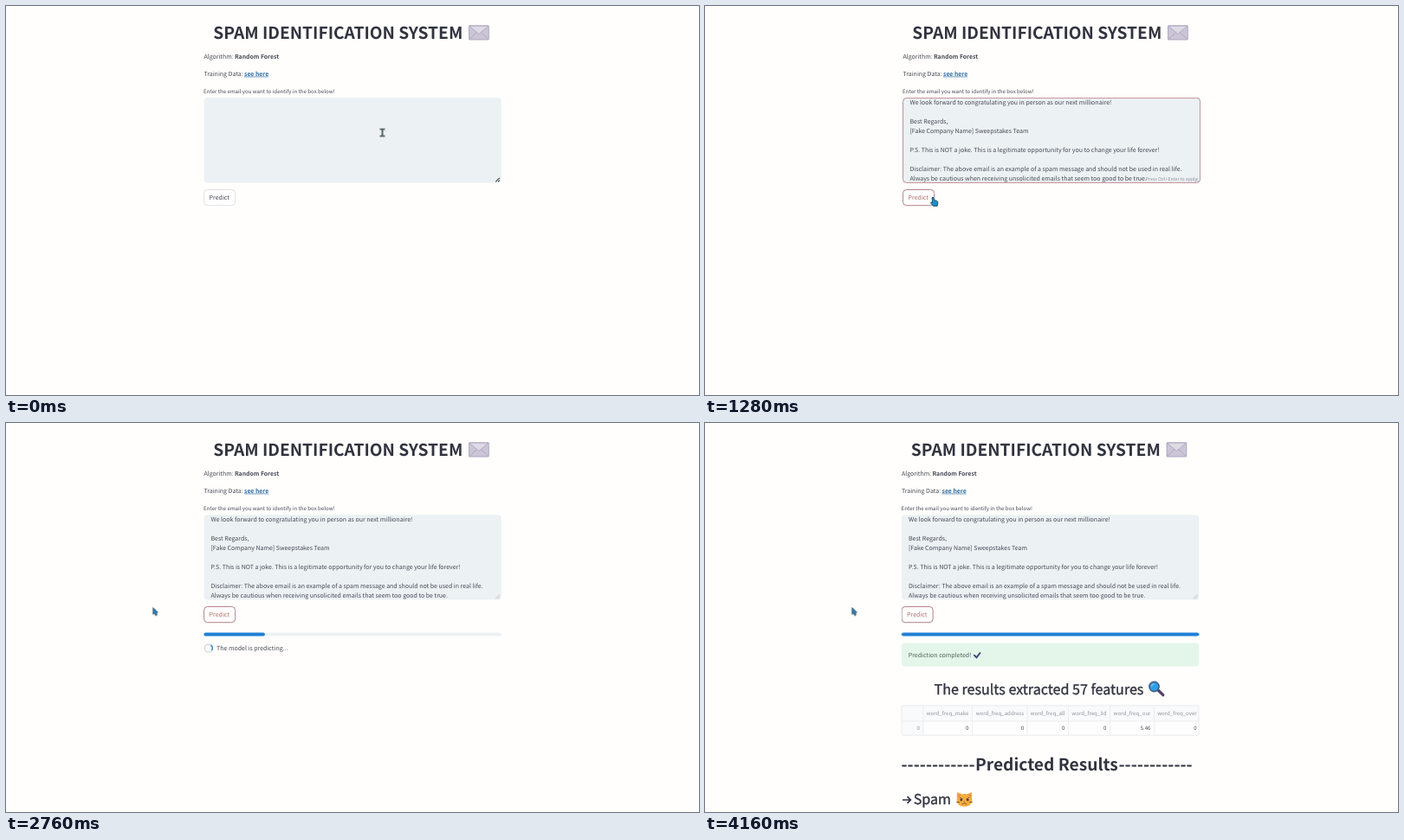
These frames come from a looping animation (800x450 px, 4320 ms). An HTML page:

```html
<!DOCTYPE html>
<html lang="en">
<head>
<meta charset="utf-8">
<title>Spam identification</title>
<style>
html, body { margin: 0; width: 100%; height: 100%; overflow: hidden; background: #fffefd; }
svg { display: block; width: 800px; height: 450px; }
text {
  font: 7.01px "Noto Sans CJK SC", "Noto Sans CJK JP", "Noto Sans CJK KR", "Noto Sans CJK TC", "Noto Sans", sans-serif;
  fill: #474953; text-rendering: geometricPrecision; white-space: pre;
}
.h1 { font-size: 19.2px; font-weight: 700; fill: #31333f; }
.h2 { font-size: 16.1px; fill: #31333f; stroke: #31333f; stroke-width: .35px; }
.small, .table text { font-size: 6.12px; }
.bold { font-size: 6.85px; font-weight: 700; }
.link { fill: #2f6fa6; text-decoration: underline; }
.table text { text-anchor: end; }
.table .dim { fill: #8f919a; }
.hint { font-size: 5.2px; fill: #8b8e98; }

/* One loop for everything; percentages are time / 43.2 ms */
.a { animation: 4320ms step-end infinite; }
.smooth { animation-timing-function: linear; }
.focus { animation-name: focus; }
.caret { animation-name: caret; }
.blank { animation-name: blank; }
.mail { animation-name: mail; }
.hinting { animation-name: hinting; }
.hot { animation-name: hot; }
.track { animation-name: track; }
.fill { animation-name: fill; }
.wait { animation-name: wait; }
.spin { animation-name: spin; }
.done { animation-name: done; }
.results { animation-name: results; }
.page { animation-name: page; }
.pointer { animation-name: pointer; }
.beam { animation-name: beam; }
.hand { animation-name: hand; }
.arrow { animation-name: arrow; }

@keyframes focus { 0% { opacity: 0 } 7.41% { opacity: 1 } 44.44%, 100% { opacity: 0 } }
@keyframes caret { 0% { opacity: 0 } 7.41% { opacity: 1 } 14.81%, 100% { opacity: 0 } }
@keyframes blank { 0% { opacity: 1 } 14.81%, 100% { opacity: .2 } }
@keyframes mail { 0% { opacity: 0 } 14.81%, 100% { opacity: 1 } }
@keyframes hinting { 0% { opacity: 0 } 14.81% { opacity: 1 } 44.44%, 100% { opacity: 0 } }
@keyframes hot { 0% { opacity: 0 } 28.7%, 100% { opacity: 1 } }
@keyframes track { 0% { opacity: 0 } 46.29%, 100% { opacity: 1 } }
@keyframes fill { 0%, 59.68% { width: 0 } 80.3%, 100% { width: 343.5px } }
@keyframes wait { 0% { opacity: 0 } 58.33% { opacity: 1 } 84.25%, 100% { opacity: 0 } }
@keyframes spin { from { transform: rotate(-913.6deg) } to { transform: rotate(641.6deg) } }
@keyframes done { 0% { opacity: 0 } 84.25%, 100% { opacity: 1 } }
@keyframes results { 0% { opacity: 0 } 86.11%, 100% { opacity: 1 } }
@keyframes page { 0% { transform: none } 86.11%, 100% { transform: translateX(-1.5px) } }
@keyframes pointer {
  0%, .93% { transform: translate(434.5px, 146.5px) }
  6.48%, 23.15% { transform: translate(419.5px, 165px) }
  25.93% { transform: translate(374px, 173px) }
  28.7%, 44.91% { transform: translate(263px, 221px) }
  49.07% { transform: translate(197.5px, 222px) }
  55.56%, 100% { transform: translate(169.5px, 213.3px) }
}
@keyframes beam { 0% { opacity: 1; stroke: #3b4f52 } 7.41% { opacity: 1; stroke: #1c5874 } 28.47%, 100% { opacity: 0 } }
@keyframes hand { 0% { opacity: 0 } 28.47% { opacity: 1 } 45.37%, 100% { opacity: 0 } }
@keyframes arrow { 0% { opacity: 0; fill: #2aa3dd } 45.37% { opacity: 1; fill: #2aa3dd } 55.56%, 100% { opacity: 1; fill: #2a86c4 } }
</style>
</head>
<body>
<svg viewBox="0 0 800 450">
  <g class="a page">
    <text class="h1" x="239.2" y="38.3">SPAM IDENTIFICATION SYSTEM</text>
    <g stroke="#a49db3" stroke-linejoin="round">
      <rect x="534.5" y="22.8" width="22.8" height="16.2" rx=".6" fill="#cbc5d7" stroke-width=".8"/>
      <path d="M534.8 38.6L543.5 30.5M557 38.6L548.3 30.5" fill="none" stroke-width=".7"/>
      <path d="M534.8 23.1L545.9 32.4L557 23.1Z" fill="#dedae6" stroke-width=".7"/>
    </g>

    <text x="228.4" y="60.8">Algorithm:</text>
    <text class="bold" x="264" y="60.8">Random Forest</text>
    <text x="228.4" y="80.6">Training Data:</text>
    <text class="bold link" x="275" y="80.6">see here</text>
    <text class="small" x="228.1" y="100.9">Enter the email you want to identify in the box below!</text>

    <rect x="228.5" y="106.3" width="343.3" height="98.2" rx="4" fill="#ecf1f4"/>
    <path class="a blank" d="M565.2 203.4L569.8 198.8M568 203.4L569.8 201.6" stroke="#3f4347" stroke-width="1.1"/>
    <path class="a caret" d="M237 114.5V124.5" stroke="#50535a" stroke-width=".8"/>
    <g class="a mail">
      <text x="236.5" y="114.3">We look forward to congratulating you in person as our next millionaire!</text>
      <text x="236.5" y="136.1">Best Regards,</text>
      <text x="236.5" y="147">[Fake Company Name] Sweepstakes Team</text>
      <text x="236.5" y="168.8">P.S. This is NOT a joke. This is a legitimate opportunity for you to change your life forever!</text>
      <text x="236.5" y="190.6">Disclaimer: The above email is an example of a spam message and should not be used in real life.</text>
      <text x="236.5" y="201.5">Always be cautious when receiving unsolicited emails that seem too good to be true.</text>
    </g>
    <text class="a hinting hint" x="568.3" y="202.1" text-anchor="end">Press Ctrl+Enter to apply</text>
    <rect class="a focus" x="228.6" y="106.4" width="343" height="98" rx="4" fill="none" stroke="#b2737c" stroke-width=".8"/>

    <rect x="228.6" y="212.5" width="36" height="18.2" rx="4" fill="#fffefe" stroke="#d4d6da" stroke-width=".7"/>
    <text x="234.6" y="224.1">Predict</text>
    <g class="a hot">
      <rect x="228.6" y="212.5" width="36" height="18.2" rx="4" fill="#fffefe" stroke="#a5696f" stroke-width=".8"/>
      <text x="234.6" y="224.1" style="fill:#ae6f6c">Predict</text>
    </g>

    <rect class="a track" x="228.4" y="242.4" width="343.5" height="4" rx="2" fill="#eef1f3"/>
    <rect class="a smooth fill" x="228.4" y="242.4" width="0" height="4" rx="2" fill="#1f80d6"/>

    <g class="a wait">
      <g transform="translate(233.8 260.5)" fill="none" stroke-width="1.4">
        <circle r="4.5" stroke="#d3d6db"/>
        <path class="a smooth spin" d="M-3.2 -3.2A4.5 4.5 0 0 1 3.2 -3.2" stroke="#2382cf"/>
      </g>
      <text x="243.1" y="263.1">The model is predicting...</text>
    </g>

    <g class="a done">
      <rect x="228.5" y="254.5" width="343.3" height="27" rx="4" fill="#e4f6ea"/>
      <text x="236.3" y="271" style="fill:#4d6359">Prediction completed!</text>
      <path d="M312.4 268.8L315 271.2L319 266" fill="none" stroke="#4c4580" stroke-width="2" stroke-linecap="round"/>
    </g>

    <g class="a results">
      <text class="h2" x="387" y="313.8" text-anchor="middle">The results extracted 57 features</text>
      <path d="M524.5 309L530.3 314.7" stroke="#51406b" stroke-width="3.2" stroke-linecap="round"/>
      <circle cx="520" cy="305" r="5.6" fill="#2ba0e4" stroke="#4b5a86" stroke-width="1.6"/>
      <path d="M517 305A3.2 3.2 0 0 1 520 301.8" fill="none" stroke="#9fd6f5"/>

      <g class="table">
        <rect x="228.6" y="326.8" width="343" height="34.4" rx="2" fill="#fffefe"/>
        <path d="M228.6 326.8H571.6V345H228.6ZM228.6 345H253.5V361.2H228.6Z" fill="#f9fafb"/>
        <path d="M228.6 345H571.6M253.5 326.8V361.2M310 326.8V361.2M373.5 326.8V361.2M421 326.8V361.2M469 326.8V361.2M520 326.8V361.2" stroke="#e5e7ea" stroke-width=".7"/>
        <rect x="228.6" y="326.8" width="343" height="34.4" rx="2" fill="none" stroke="#e2e4e8" stroke-width=".7"/>
        <g>
          <text class="dim" x="305.9" y="338.2">word_freq_make</text>
          <text class="dim" x="369.6" y="338.2">word_freq_address</text>
          <text class="dim" x="417" y="338.2">word_freq_all</text>
          <text class="dim" x="465" y="338.2">word_freq_3d</text>
          <text class="dim" x="516" y="338.2">word_freq_our</text>
          <text class="dim" x="569.2" y="338.2">word_freq_over</text>
        </g>
        <text class="dim" x="249.3" y="355.2">0</text>
        <text x="305.9" y="355.2">0</text>
        <text x="369.6" y="355.2">0</text>
        <text x="417" y="355.2">0</text>
        <text x="465" y="355.2">0</text>
        <text x="516" y="355.2">5.46</text>
        <text x="569.2" y="355.2">0</text>
      </g>

      <text class="h1" x="228" y="402.2">------------<tspan x="313.5">Predicted Results</tspan><tspan x="479">------------</tspan></text>

      <path d="M229.5 436H238.5M235 432.2L238.8 436L235 439.8" fill="none" stroke="#31333f" stroke-width="1.7"/>
      <text class="h2" x="242.2" y="440.6">Spam</text>
      <g transform="translate(301 435.5)">
        <path d="M-8.6 -8.6L-3.2 -6.2Q0 -7 3.2 -6.2L8.6 -8.6L8.8 1Q8.6 8.2 0 8.2Q-8.6 8.2 -8.8 1Z" fill="#f6ad3c"/>
        <path d="M-7.3 -6.4L-4.2 -4.8L-7 -2ZM7.3 -6.4L4.2 -4.8L7 -2Z" fill="#e58b5a"/>
        <path d="M-5.6 -2.2L-1.8 -.4M5.6 -2.2L1.8 -.4M-2.8 5.6Q0 2.8 2.8 5.6M-9.3 3L-5.5 3.2M9.3 3L5.5 3.2" fill="none" stroke="#6b4a3c" stroke-width=".9"/>
        <circle cx="-3.8" cy=".6" r="1.3" fill="#4c3a3a"/>
        <circle cx="3.8" cy=".6" r="1.3" fill="#4c3a3a"/>
        <path d="M-1.2 2H1.2L0 3.4Z" fill="#d4625f"/>
      </g>
    </g>
  </g>

  <g class="a smooth pointer">
    <path class="a beam" d="M-3 -4H3M0 -4V4M-3 4H3" fill="none" stroke="#3b4f52" stroke-width="1.7"/>
    <path class="a hand" d="M-1 .8Q.1 -.3 1 .8L1.7 3.6L4.7 4.4Q6 4.8 5.8 6.3L5.2 10.4H.6L-2.4 7Q-2.6 5.6 -.4 6Z" fill="#1d8fc8" stroke="#24485f" stroke-width=".9" stroke-linejoin="round"/>
    <path class="a arrow" d="M.3 .3V8L2.1 6.6L3.4 9.5L4.9 8.8L3.6 6H5.9Z" fill="#2aa3dd" stroke="#2a4860" stroke-width=".9" stroke-linejoin="round"/>
  </g>
</svg>
</body>
</html>
```
